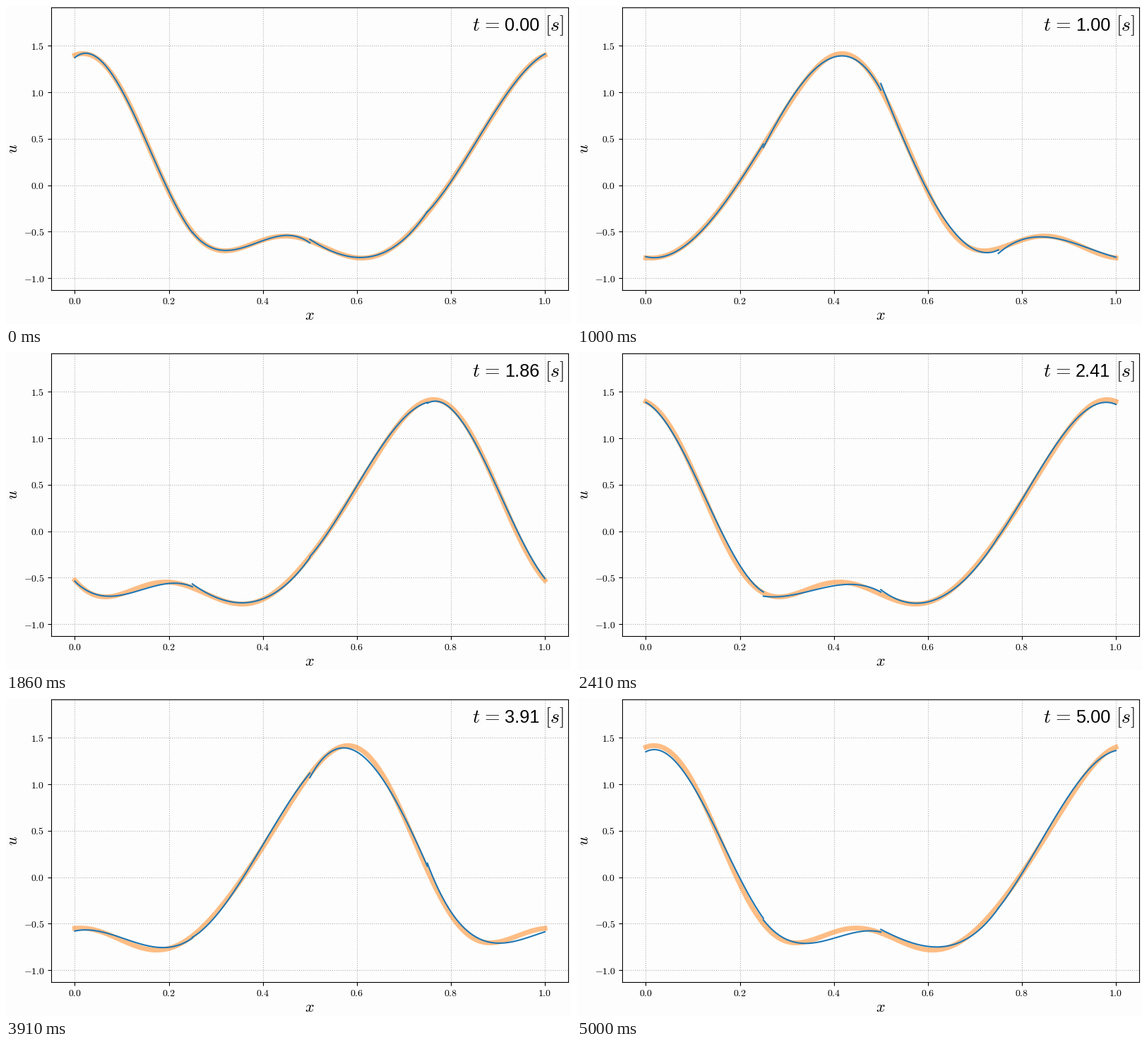
A matplotlib script for the animation above (5050 ms loop, 800 by 450 pixels).

```python
import numpy as np
import matplotlib.pyplot as plt
from matplotlib.animation import FuncAnimation
from numpy.polynomial import legendre

W, H, DPI = 800, 450, 100
FRAMES, INTERVAL = 202, 25
STEPS_PER_SECOND, LAST_STEP = 22, 110
SPEED, CELLS, DEGREE = 0.4, 4, 3
TAU = 2 * np.pi


def wave(x):
    return np.cos(TAU * x) + 0.4 * np.cos(2 * TAU * x) + 0.1 * np.sin(3 * TAU * x)


# Upwind discontinuous Galerkin scheme in a Legendre basis, periodic domain
h = 1 / CELLS
n = np.arange(DEGREE + 1)
row, col = np.meshgrid(n, n, indexing="ij")
stiff = 2.0 * ((row > col) & ((row - col) % 2 == 1))
scale = SPEED * (2 * row + 1) / h
own = scale * (stiff - 1)
inflow = scale * (-1.0) ** row
eye = np.eye(CELLS)
operator = np.kron(eye, own) + np.kron(np.roll(eye, 1, axis=0), inflow)

# L2 projection of the initial wave
nodes, weights = legendre.leggauss(12)
centers = (np.arange(CELLS) + 0.5) * h
samples = wave(centers[:, None] + nodes * h / 2)
start = (samples * weights) @ legendre.legvander(nodes, DEGREE) * (2 * n + 1) / 2

rates, modes = np.linalg.eig(operator)
amps = np.linalg.solve(modes, start.ravel().astype(complex))


def coeffs(t):
    return (modes @ (amps * np.exp(rates * t))).real.reshape(CELLS, -1)


plt.rcParams["mathtext.fontset"] = "cm"
fig = plt.figure(figsize=(W / DPI, H / DPI), dpi=DPI, facecolor="#fdfdfd")

left, right, top, bottom = 64.2, 796.3, 2.2, 401.8
ax = fig.add_axes([left / W, 1 - bottom / H, (right - left) / W, (bottom - top) / H],
                  facecolor="#fdfdfd")
ax.set_xlim(-0.05, 1.05)
ax.set_ylim(-1.1262, 1.9125)
ax.set_xticks(np.arange(6) / 5)
ax.set_yticks(np.arange(-2, 4) / 2)
for axis in (ax.xaxis, ax.yaxis):
    axis.set_major_formatter(lambda v, _: f"${v:.1f}$")
ax.tick_params(axis="x", pad=3)
ax.grid(ls=":")
ax.set_axisbelow(True)


def label(x, y, text, size, **kw):
    return fig.text(x, H - y, text, fontsize=size, transform=None,
                    va="baseline", rotation_mode="anchor", **kw)


label(430, 443.8, "$x$", 16, ha="center")
label(16, 201.8, "$u$", 16, ha="center", rotation=90)
label(660, 35, r"$t\hspace{0.117}=$", 20)
clock = label(706, 35, "", 18.3, family="Liberation Sans")
label(763, 35, "$[s]$", 20)

xs = np.linspace(0, 1, 301)
xi = np.linspace(-1, 1, 60)
basis = legendre.legvander(xi, DEGREE)
exact, = ax.plot(xs, wave(xs), color="C1", alpha=0.5, lw=5)
pieces = [ax.plot(c + xi * h / 2, xi, color="C0", lw=1.5)[0] for c in centers]


def update(i):
    # Each frame shows the latest solver step reached by its end
    step = min((i + 1) * INTERVAL * STEPS_PER_SECOND // 1000, LAST_STEP)
    t = step / STEPS_PER_SECOND
    exact.set_ydata(wave(xs - SPEED * t))
    for line, c in zip(pieces, coeffs(t)):
        line.set_ydata(basis @ c)
    clock.set_text(f"{t:.2f}")
    return [exact, *pieces, clock]


anim = FuncAnimation(fig, update, frames=FRAMES, interval=INTERVAL,
                     repeat=True, repeat_delay=0, blit=False)
plt.show()
```
